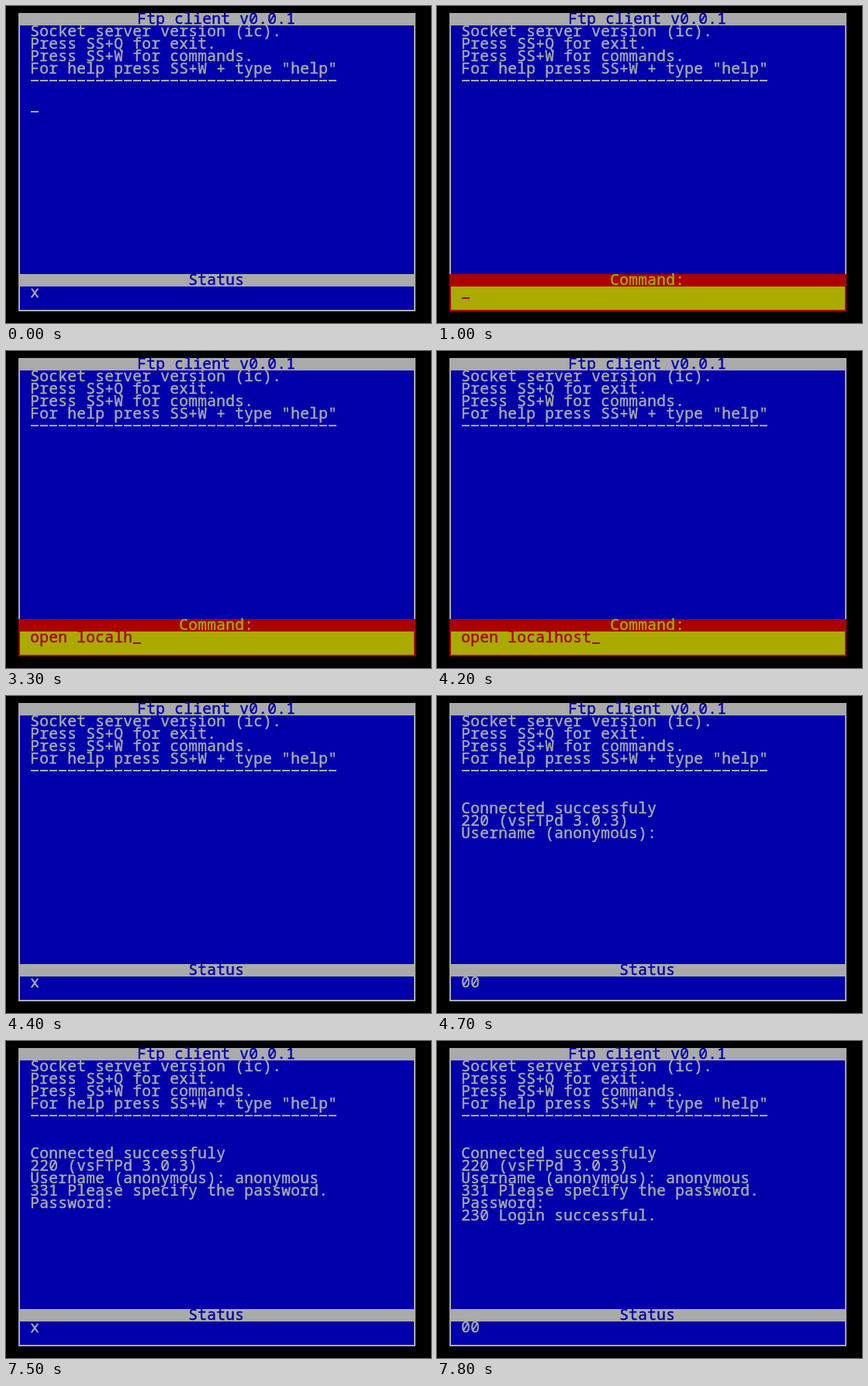
These frames come from a looping animation (548 by 408 pixels, 8 s). An HTML page:

```html
<!DOCTYPE html>
<html lang="en">
<head>
<meta charset="utf-8">
<title>Ftp client</title>
<style>
  html, body { margin: 0; width: 100%; height: 100%; overflow: hidden; background: #000; }
  svg { display: block; width: 548px; height: 408px; }
  text {
    font: 500 19.5px "Noto Sans Mono", "DejaVu Sans Mono", monospace;
    letter-spacing: .3px; white-space: pre; stroke: currentColor; stroke-width: .45px;
  }
</style>
</head>
<body>
<svg id="stage" viewBox="0 0 548 408"></svg>
<script>
const LOOP = 8000, CELL = 12, ROW = 16, LEFT = 32, TOP = 25, PANEL = 345;
const BLUE = "#0000aa", GREY = "#aaaaaa", RED = "#aa0000", YELLOW = "#aaaa00";
const stage = document.getElementById("stage");

function add(tag, attrs) {
  const el = document.createElementNS("http://www.w3.org/2000/svg", tag);
  for (const key in attrs) el.setAttribute(key, attrs[key]);
  return stage.appendChild(el);
}
const rect = (x, y, width, height, fill) =>
  add("rect", { x, y, width, height, fill, "shape-rendering": "crispEdges" });

const ink = (el, color) => {
  el.setAttribute("fill", color);
  el.setAttribute("color", color);
};

// y is the top of the character row
function label(x, y, color, str = "") {
  const el = add("text", { x: x - 0.8, y: y + 14 });
  ink(el, color);
  el.textContent = str;
  return el;
}
const centre = str => 272 - str.length * CELL / 2;
const rowY = n => TOP + n * ROW;
const show = (el, on) => el.setAttribute("visibility", on ? "visible" : "hidden");

// Main window
rect(16, 9, 512, 384, GREY);
rect(18, TOP, 508, PANEL - TOP, BLUE);
const title = "Ftp client v0.0.1";
label(centre(title), 9, BLUE, title);
["Socket server version (ic).", "Press SS+Q for exit.", "Press SS+W for commands.",
 "For help press SS+W + type \"help\""].forEach((s, i) => label(LEFT, rowY(i), GREY, s));
for (let i = 0; i < 33; i++) rect(LEFT + i * CELL, rowY(4) + 6, 10, 2, GREY);

// Lower panel
const frame = rect(16, PANEL, 512, 48, GREY);
const inner = rect(18, PANEL + ROW, 508, 30, BLUE);
const heading = label(0, PANEL, BLUE);
const entry = label(LEFT, PANEL + ROW, GREY);

const mainCursor = rect(LEFT, rowY(6) + 14, 10, 2, GREY);
const cmdCursor = rect(LEFT, PANEL + ROW + 14, 10, 2, RED);

// Log lines: [time, row, text]
const log = [
  [4500, 7, "Connected successfuly"],
  [4600, 8, "220 (vsFTPd 3.0.3)"],
  [4700, 9, "Username (anonymous):"],
  [6400, 9, "                      anonymous"],
  [6600, 10, "331 Please specify the password."],
  [6600, 11, "Password:"],
  [7700, 12, "230 Login successful."]
].map(([at, row, str]) => ({ at, el: label(LEFT, rowY(row), GREY, str) }));

// Keystrokes: [time, characters typed, cursor visible]
const COMMAND = "open localhost";
const keys = [
  [1000, 0, 1], [1200, 0, 0], [1300, 1, 1], [1400, 2, 1], [1500, 3, 0], [1600, 3, 1],
  [1800, 4, 1], [1900, 4, 0], [2000, 5, 1], [2200, 5, 0], [2700, 7, 0],
  [2900, 7, 1], [3000, 8, 1], [3100, 9, 1], [3200, 10, 1], [3300, 11, 1],
  [3500, 12, 1], [3600, 13, 1], [3700, 14, 0], [3800, 14, 1], [4000, 14, 0], [4200, 14, 1]
];
const states = [[0, "x"], [4700, "00"], [6500, "x"], [6600, "00"], [7500, "x"], [7800, "00"]];
const latest = (list, t) => list.filter(item => item[0] <= t).pop();

function setPanel(name, border, fill, str) {
  frame.setAttribute("fill", border);
  inner.setAttribute("fill", fill);
  ink(heading, fill);
  heading.setAttribute("x", centre(name) - 0.8);
  heading.textContent = name;
  ink(entry, border);
  entry.textContent = str;
}

function draw(t) {
  const typing = t >= 1000 && t < 4400;
  show(mainCursor, t < 100 || (t >= 300 && t < 500) || (t >= 800 && t < 1000));
  if (typing) {
    const [, count, on] = latest(keys, t);
    setPanel("Command:", RED, YELLOW, COMMAND.slice(0, count));
    cmdCursor.setAttribute("x", LEFT + count * CELL);
    show(cmdCursor, on);
  } else {
    setPanel("Status", GREY, BLUE, latest(states, t)[1]);
    show(cmdCursor, false);
  }
  for (const { at, el } of log) show(el, t >= at);
}

const start = performance.now();
function tick() {
  draw((performance.now() - start) % LOOP);
  requestAnimationFrame(tick);
}
draw(0);
requestAnimationFrame(tick);
</script>
</body>
</html>
```
